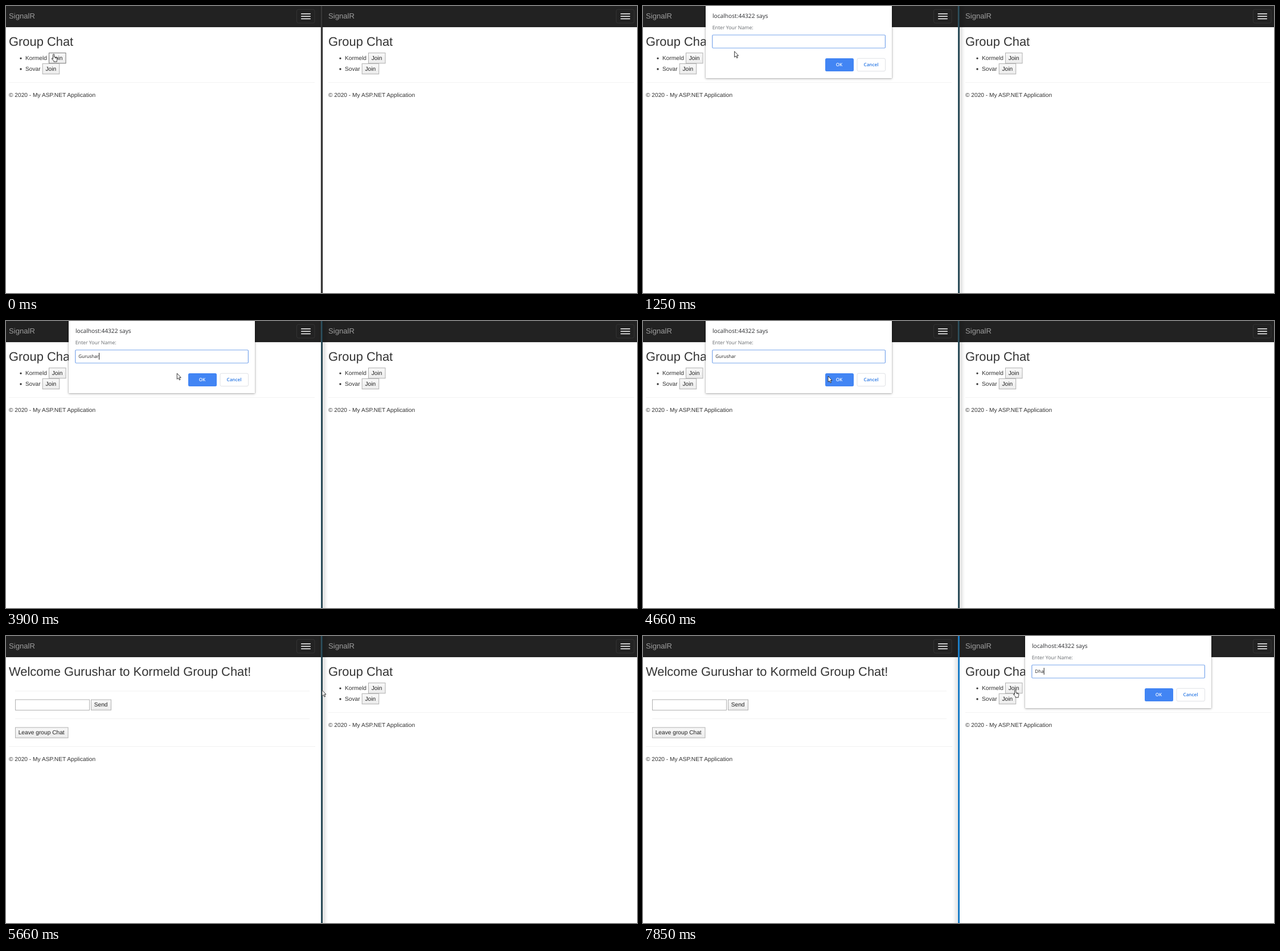
An HTML page for the animation above (8 s loop, 1108x505 px).

```html
<!DOCTYPE html>
<html lang="en">
<head>
<meta charset="utf-8">
<title>Group Chat</title>
<style>
html, body { margin: 0; width: 100%; height: 100%; overflow: hidden; background: #fff; }
#stage { position: relative; width: 100%; height: 100%; overflow: hidden; contain: strict; }
svg { position: absolute; left: 0; top: 0; overflow: hidden; }
text { text-rendering: geometricPrecision; white-space: pre; }
.page text { font: 10.2px "Liberation Sans", Arial, sans-serif; fill: #333; }
.page .h { font-size: 21.9px; }
.page .brand { font-size: 13.1px; fill: #9d9d9d; }
.btn rect { fill: url(#face); stroke: #b0b0b0; }
.btn.hover rect { stroke: #777; }
.btn text { fill: #222; }
.bar { position: absolute; left: 553px; top: -20px; width: 3px; height: 545px; }
.dialog { position: absolute; top: -40px; width: 327px; height: 166.5px; background: #fff;
  box-shadow: 0 0 1px rgba(0,0,0,.45), 0 1px 4px rgba(0,0,0,.3); transform-origin: 50% 40px; }
.dialog svg { top: 40px; }
.dialog text { font: 8.1px "Open Sans", "Noto Sans", sans-serif; fill: #222; }
.dialog .title { font-size: 10.2px; fill: #2a2b2e; }
.dialog .label { font-size: 8.77px; fill: #666a6e; }
.dialog .b { font-weight: 600; text-anchor: middle; }
</style>
</head>
<body>
<div id="stage"></div>
<script>
const LOOP = 8000, BLINK = 550, SHIFT = 561;
const TOPIC = 'Kormeld', OTHER = 'Sovar', USER = 'Gurushar', SECOND = 'Dha';

const text = (x, y, s, cls = '') => `<text x="${x}" y="${y}" class="${cls}">${s}</text>`;
const line = (x1, x2, y) => `<rect x="${x1}" y="${y}" width="${x2 - x1}" height=".8" fill="#eee"/>`;
const button = (x, y, w, s, id = '') => `<g class="btn" id="${id}">
  <rect x="${x + .5}" y="${y + .5}" width="${w - 1}" height="18.2"/>${text(x + 5.7, y + 12.8, s)}</g>`;
const footer = y => text(5, y, '© 2020 - My ASP.NET Application');

const navbar = end => `<rect x="-6" width="${end + 6}" height="37.1" fill="#222"/>
  <rect x="-6" y="36.3" width="${end + 6}" height=".8" fill="#080808"/>
  ${text(5, 22.3, 'SignalR', 'brand')}
  <rect x="510.5" y="6" width="31.5" height="24" rx="3" fill="none" stroke="#333"/>
  ${[13.1, 17.4, 21.8].map(y => `<rect x="518" y="${y}" width="17" height="1.5" rx=".7" fill="#fff"/>`).join('')}`;

const item = (y, s, x, id) => `<circle cx="26" cy="${y - 2.8}" r="1.7" fill="#333"/>
  ${text(34, y, s)}${button(x, y - 12.8, 30.5, 'Join', id)}`;
const lobby = id => text(5, 70.4, 'Group Chat', 'h') + item(94.9, TOPIC, 75, id) +
  item(113.8, OTHER, 63.7, '') + line(5, 542, 134.3) + footer(160.4);

const room = text(5, 70.4, `Welcome ${USER} to ${TOPIC} Group Chat!`, 'h') +
  line(16, 533, 96.5) + line(16, 533, 145.3) + line(5, 543, 194.1) +
  '<rect x="16.5" y="112" width="130" height="18.5" fill="#fff" stroke="#b0b0b0"/>' +
  button(149, 111.6, 36, 'Send') + button(16, 160.5, 93.5, 'Leave group Chat') + footer(220.2);

const dialog = (id, x) => `<div class="dialog" id="${id}" style="left:${x}px"><svg width="327" height="127">
  ${text(12, 20.8, 'localhost:44322 says', 'title')}${text(11.7, 41.4, 'Enter Your Name:', 'label')}
  <rect x="11.8" y="51" width="303.6" height="23" rx="1.5" fill="#fff" stroke="#78a5ec" stroke-width="1.2"/>
  ${text(17.3, 65.2, '', 'typed')}<rect class="caret" y="56" width="1" height="12" fill="#222"/>
  <rect x="210" y="92" width="50" height="23" rx="2.5" fill="#4285f4"/>
  <text class="b" x="234.5" y="106.3" style="fill:#fff">OK</text>
  <rect x="266" y="92.2" width="49.5" height="22.5" rx="2.5" fill="#fff" stroke="#dfe1e5"/>
  <text class="b" x="290.5" y="106.3" style="fill:#2a78e4">Cancel</text></svg></div>`;

const $ = id => document.getElementById(id);
const show = (id, on) => $(id).style.display = on ? '' : 'none';
const clamp = v => Math.min(1, Math.max(0, v));

$('stage').innerHTML = `<svg class="page" width="1108" height="505">
  <defs><linearGradient id="face" x2="0" y2="1"><stop stop-color="#f8f8f8"/><stop offset="1" stop-color="#ececec"/></linearGradient></defs>
  <g>${navbar(553)}<g id="lobby">${lobby('join1')}</g><g id="room">${room}</g></g>
  <g transform="translate(${SHIFT})">${navbar(547)}${lobby('join2')}</g></svg>
  <div class="bar" id="bar"></div>${dialog('d1', 110)}${dialog('d2', 110 + SHIFT)}
  <svg width="1108" height="505"><g id="pointer" fill="#fff" stroke="#222" stroke-width=".9" stroke-linejoin="round">
  <path id="arrow" d="M0 0V10.3L2.4 8.2 4.1 11.8 5.7 11.1 4.1 7.5H7Z"/>
  <path id="hand" d="M-.9 8.6V1.3a1.1 1.1 0 0 1 2.2 0V5.2l4 1q1 .3 1 1.4v2.2q0 1-.6 2V13.6H.5V12L-2.9 8.6q-.5-.9.4-1.3t1.6 1.3ZM2.9 5.7v2M4.5 6.1v1.7"/>
  </g></svg>`;

// time, x, y of the pointer's tip
const path = [[0, 83.5, 84.5], [89, 83.5, 84.5], [90, 84, 85.5], [1019, 84, 85.5], [1020, 100, 84.5],
  [1340, 184, 78], [3450, 184, 78], [3900, 300, 92], [4060, 343, 101], [4280, 325, 97],
  [5150, 325, 97], [5880, 653.5, 94.5], [LOOP, 653.5, 94.5]];

function pointerAt(t) {
  const i = path.findIndex(p => p[0] > t), [a, x, y] = path[i - 1], [b, x2, y2] = path[i];
  const k = (t - a) / (b - a);
  return [x + (x2 - x) * k, y + (y2 - y) * k];
}

// keys: the times at which the letters of the name are typed
const prompts = [
  { id: 'd1', name: USER, open: 475, close: 4680, focus: 470,
    keys: [1720, 1800, 2110, 2190, 2340, 2410, 2640, 2720] },
  { id: 'd2', name: SECOND, open: 6323, close: Infinity, focus: 6350, keys: [7450, 7680, 7850] }
];

function drawPrompt(p, t) {
  const el = $(p.id), age = t - p.open, gone = clamp((t - p.close) / 190);
  const alpha = gone ? 1 - gone : clamp(age / 220);
  const tilt = gone || (1 - clamp(age / 320)) ** 1.25;
  show(p.id, alpha > 0);
  if (!alpha) return;
  el.style.opacity = alpha;
  el.style.transform = tilt ? `translateY(${-16 * tilt}px) perspective(1000px) rotateX(${10.7 * tilt}deg)` : 'none';
  const typed = el.querySelector('.typed'), caret = el.querySelector('.caret');
  const n = p.keys.filter(k => k <= t).length, last = n ? p.keys[n - 1] : p.focus;
  typed.textContent = p.name.slice(0, n);
  caret.setAttribute('x', n ? 17.3 + typed.getComputedTextLength() : 17);
  caret.style.opacity = Math.floor(Math.max(0, t - last) / BLINK) % 2 ? 0 : 1;
}

function draw(t) {
  show('lobby', t < 4930);
  show('room', t >= 4930);
  $('join1').classList.toggle('hover', t < 720);
  $('join2').classList.toggle('hover', t >= 5840 && t < 6360);
  const [edge, color, shadow] = t < 320 ? ['#444', '#2b2b2b', '0 0 3px rgba(0,0,0,.35)']
    : t < 6280 ? ['#3f6473', '#1f3d49', '3px 0 6px rgba(0,0,0,.3)']
    : ['#2f87c8', '#0f78c6', '-3px 0 6px rgba(0,0,0,.25)'];
  $('bar').style.background = `linear-gradient(90deg, ${edge} 1px, ${color} 1px)`;
  $('bar').style.boxShadow = shadow;
  prompts.forEach(p => drawPrompt(p, t));
  const [x, y] = pointerAt(t), hand = t < 1020 || x > 636;
  $('pointer').setAttribute('transform', `translate(${x} ${y})`);
  show('hand', hand);
  show('arrow', !hand);
}

const start = performance.now();
function tick() {
  draw((performance.now() - start) % LOOP);
  requestAnimationFrame(tick);
}
tick();
</script>
</body>
</html>
```
